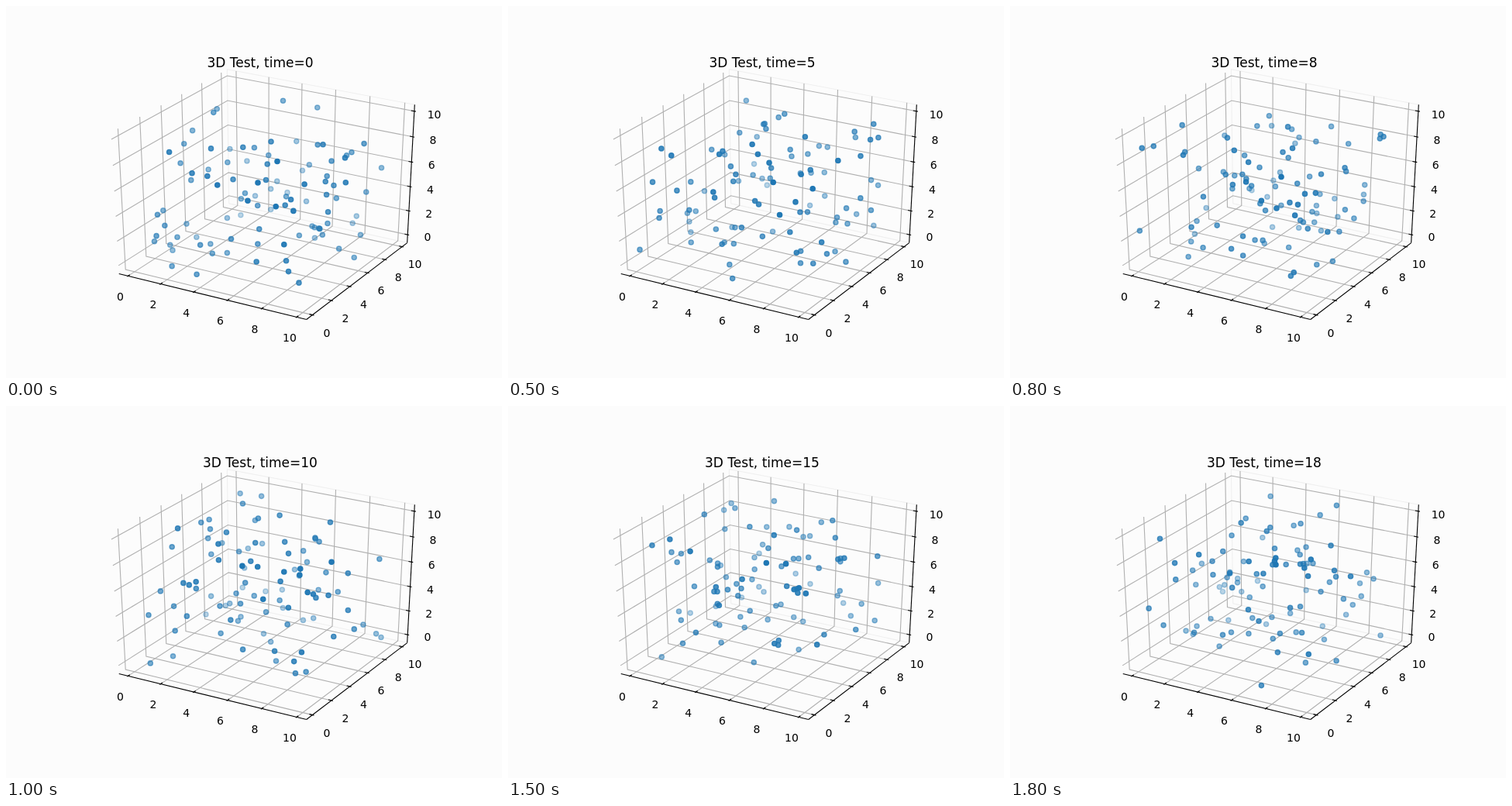
An HTML page that plays this animation: 640 px wide and 480 px high, repeating every 1.9 s.

```html
<!DOCTYPE html>
<html lang="en">
<head>
<meta charset="utf-8">
<title>3D Test</title>
<style>
  html, body { margin: 0; width: 100%; height: 100%; overflow: hidden; background: #fcfcfc; }
  svg { display: block; width: 640px; height: 480px; }
  text { font-family: "DejaVu Sans", sans-serif; font-size: 14px; text-anchor: middle; }
  #title { font-size: 17px; }
  path { fill: none; stroke-width: 1.11; }
  circle { fill: #1f77b4; stroke: #1f77b4; stroke-width: 1.39; }
</style>
</head>
<body>
<svg viewBox="0 0 640 480">
  <g id="axes"></g>
  <g id="dots"></g>
  <text id="title" x="328" y="79"></text>
</svg>
<script>
const STEP = 100, STEPS = 19, COUNT = 100;
const LOW = [-0.335, -0.40, -0.465];
const SPAN = [10.67, 10.79, 10.75];
const A = -1 / 48, B = 1 + 1 / 48;   // padded box around the unit cube

const byId = id => document.getElementById(id);
const axes = byId('axes'), dots = byId('dots'), title = byId('title');

function add(parent, tag, attrs) {
  const el = document.createElementNS('http://www.w3.org/2000/svg', tag);
  for (const k in attrs) el.setAttribute(k, attrs[k]);
  return parent.appendChild(el);
}

// Perspective view of the unit cube: azimuth -60, elevation 30, distance 10
const S3 = Math.sqrt(3);
function project([px, py, pz]) {
  const x = px - 0.5, y = py - 0.5, z = pz - 0.5;
  const depth = 10 - (S3 / 4 * x - 0.75 * y + 0.5 * z);
  const right = (S3 / 2 * x + 0.5 * y) / depth;
  const up = (-0.25 * x + S3 / 4 * y + S3 / 2 * z) / depth;
  return {
    x: 80 + (right + 0.095) / 0.185 * 496,
    y: 427.2 - (up + 0.095) / 0.185 * 369.6,
    z: -10 / depth
  };
}

const unit = (v, axis) => (v - LOW[axis]) / SPAN[axis];

function line(color, ...points) {
  const d = points.map(project).map(p => p.x.toFixed(2) + ' ' + p.y.toFixed(2)).join('L');
  add(axes, 'path', { d: 'M' + d, stroke: color });
}

function buildAxes() {
  line('#f0f0f0', [A, B, A], [A, B, B], [B, B, B]);
  line('#f0f0f0', [A, B, A], [B, B, A]);

  const grids = [
    v => [[v, A, A], [v, B, A], [v, B, B]],
    v => [[B, v, A], [A, v, A], [A, v, B]],
    v => [[A, A, v], [A, B, v], [B, B, v]]
  ];
  const spots = [v => [v, A, A], v => [B, v, A], v => [B, B, v]];
  const shifts = [
    t => [0.8 * t - 9.8, 26.5],
    t => [18.5 - 2 * t, 23.4 - t],
    t => [25.8, 2.9 + 1.3 * t]
  ];
  const tickAxis = [1, 0, 0];

  for (let a = 0; a < 3; a++)
    for (let n = 0; n <= 10; n += 2) line('#b0b0b0', ...grids[a](unit(n, a)));

  for (let a = 0; a < 3; a++) {
    line('#000', spots[a](A), spots[a](B));
    for (let n = 0; n <= 10; n += 2) {
      const spot = spots[a](unit(n, a));
      const side = a === 0 ? -1 : 1;
      const outer = spot.slice(), inner = spot.slice();
      outer[tickAxis[a]] += side * 0.1 / 12;
      inner[tickAxis[a]] -= side * 0.2 / 12;
      line('#000', outer, inner);
      const p = project(spot), [dx, dy] = shifts[a](n / 10);
      add(axes, 'text', { x: p.x + dx, y: p.y + dy + 5 }).textContent = n;
    }
  }
}

function randomizer(seed) {
  return () => {
    seed = seed + 0x6D2B79F5 | 0;
    let t = Math.imul(seed ^ seed >>> 15, 1 | seed);
    t = t + Math.imul(t ^ t >>> 7, 61 | t) ^ t;
    return ((t ^ t >>> 14) >>> 0) / 4294967296;
  };
}

// A fresh uniform cloud for each step, sorted far to near
function cloud(step) {
  const rnd = randomizer(1000 + step * 7919);
  const value = axis => unit(10 * rnd(), axis);
  const points = Array.from({ length: COUNT }, () => project([value(0), value(1), value(2)]));
  points.sort((p, q) => q.z - p.z);
  const far = points[0].z, near = points[COUNT - 1].z;
  for (const p of points) p.alpha = 1 - 0.7 * (p.z - near) / (far - near);
  return points;
}

buildAxes();
const clouds = Array.from({ length: STEPS }, (_, i) => cloud(i));
const marks = Array.from({ length: COUNT }, () => add(dots, 'circle', { r: 3.1 }));
let shown = -1;

function draw(ms) {
  const step = Math.floor(ms / STEP) % STEPS;
  if (step === shown) return;
  shown = step;
  title.textContent = '3D Test, time=' + step;
  clouds[step].forEach((p, i) => {
    const m = marks[i];
    m.setAttribute('cx', p.x.toFixed(2));
    m.setAttribute('cy', p.y.toFixed(2));
    m.setAttribute('fill-opacity', p.alpha.toFixed(3));
    m.setAttribute('stroke-opacity', p.alpha.toFixed(3));
  });
}

const start = performance.now();
function tick() {
  draw(performance.now() - start);
  requestAnimationFrame(tick);
}
tick();
</script>
</body>
</html>
```
